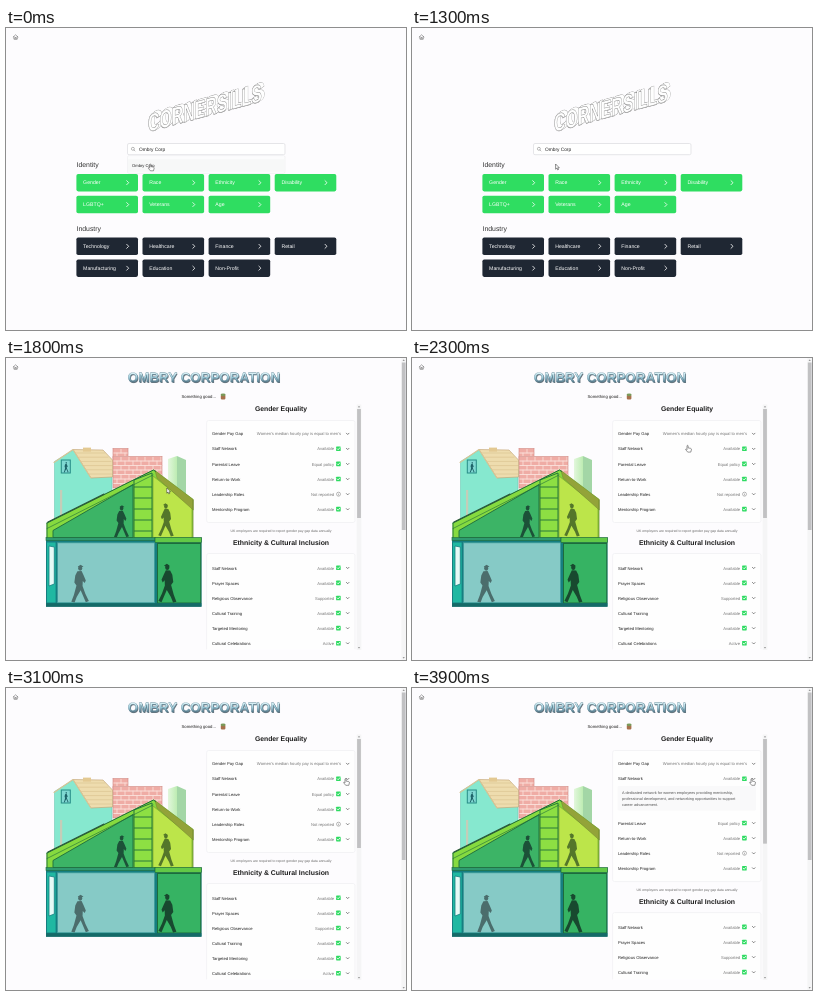
Write an HTML page that moves like this. It is 400 px wide and 302 px high and loops after 4000 ms.

```html
<!DOCTYPE html>
<html lang="en">
<head>
<meta charset="utf-8">
<title>Employer search</title>
<style>
  html, body { margin: 0; width: 100%; height: 100%; overflow: hidden; background: #fdfcfe; }
  svg { display: block; width: 100vw; height: 100vh; }
  text { font-family: "Liberation Sans", Arial, sans-serif; text-rendering: geometricPrecision; white-space: pre; }
  .bold { font-weight: 700; }
  .mid { text-anchor: middle; }
  .end { text-anchor: end; }
  .line { fill: none; stroke-linecap: round; stroke-linejoin: round; }
</style>
</head>
<body>
<svg id="stage" viewBox="0 0 400 302"></svg>
<script>
const LOOP = 4000, STEP = 100;
const COMPANY = 'Ombry Corp', COMPANY_TITLE = 'OMBRY CORPORATION', LOGOTYPE = 'CORNERSILLS';

const rect = (x, y, w, h, fill, more = '') =>
  `<rect x="${x}" y="${y}" width="${w}" height="${h}" fill="${fill}" ${more}/>`;
const label = (x, y, size, str, fill = '#222', cls = '') =>
  `<text x="${x}" y="${y}" font-size="${size}" fill="${fill}" class="${cls}">${str}</text>`;
const line = (d, stroke, width) =>
  `<path class="line" d="${d}" stroke="${stroke}" stroke-width="${width}"/>`;
const shape = (points, fill, stroke = 'none', width = 1) =>
  `<polygon points="${points}" fill="${fill}" stroke="${stroke}" stroke-width="${width}" stroke-linejoin="round"/>`;
const range = n => [...Array(n).keys()];

// ---- search page ----
function logotype() {
  const copy = (d, style) =>
    `<text class="bold" font-size="25" transform="matrix(.635 -.172 0 1 ${142 + d} ${104 - d * .8})" ${style}>${LOGOTYPE}</text>`;
  const depth = [3, 2.25, 1.5, .75, 0];
  return depth.map(d => copy(d, 'fill="#fff" stroke="#999" stroke-width=".9"')).join('')
    + depth.map(d => copy(d, 'fill="#fefefe"')).join('')
    + copy(0, 'fill="#fefefe" stroke="#888" stroke-width=".5"');
}

function buttons(names, y0, fill) {
  return names.map((name, i) => {
    const x = 70.4 + i % 4 * 66.1, y = y0 + Math.floor(i / 4) * 21.9;
    return rect(x, y, 61.6, 17.5, fill, 'rx="1.8"')
      + label(x + 6.7, y + 10.4, 5.2, name, '#fff')
      + line(`M${x + 50.3} ${y + 6.8}l2 2l-2 2`, '#fff', .8);
  }).join('');
}

const searchPage = logotype()
  + rect(121.5, 115.5, 157.5, 11.2, '#fff', 'rx="1.5" stroke="#dcdce0" stroke-width=".7"')
  + `<circle cx="126.9" cy="120.8" r="1.5" fill="none" stroke="#777" stroke-width=".5"/>`
  + line('M128 122l1 1', '#777', .5)
  + label(133, 122.8, 4.8, COMPANY)
  + label(70.5, 138.7, 6.9, 'Identity', '#333')
  + label(70.5, 202.7, 6.9, 'Industry', '#333')
  + buttons(['Gender', 'Race', 'Ethnicity', 'Disability', 'LGBTQ+', 'Veterans', 'Age'], 145.9, '#2fdd61')
  + buttons(['Technology', 'Healthcare', 'Finance', 'Retail', 'Manufacturing', 'Education', 'Non-Profit'], 209.5, '#1f2733')
  + `<g id="menu">${rect(121.5, 127.6, 157.5, 17.8, '#fcfcfd', 'rx="1.5" stroke="#ececef" stroke-width=".6"')}
     ${rect(122, 131.3, 156.5, 12.4, '#f7f8f8')}${label(126, 139.1, 4.15, COMPANY)}</g>`;

// ---- company page: house ----
const person = (x, y, k, fill, dir = 1) =>
  `<g transform="translate(${x} ${y}) scale(${k * dir} ${k})" fill="${fill}">
     <ellipse cx=".6" cy="2.7" rx="1.7" ry="2.3"/>
     <path d="M-1.5 1.6L1 -.2L3.4 1.4L0 2.6Z"/>
     <path d="M-1.8 5.4L1.8 5.2L3.4 8.6L5.4 13.2L4.4 15.4L2.8 13.6L2.6 18L5 24.6L8 30.8L5.4 31.8L1 21.6L-2.4 27.4L-4.2 32L-7 31.4L-4.8 25.6L-2.6 17.5L-4.4 15L-3.6 9Z"/>
   </g>`;

function bricks(x, y, w, rows) {
  let out = rect(x, y, w, rows * 4.5, '#efaca5');
  for (let r = 0; r < rows; r++) {
    out += line(`M${x} ${y + r * 4.5}h${w}`, '#fbe3dc', .9);
    for (let bx = x + (r % 2 ? 4 : 8); bx < x + w; bx += 8)
      out += line(`M${bx} ${y + r * 4.5}v4.5`, '#fbe3dc', .8);
  }
  return out + rect(x, y, w, rows * 4.5, 'none', 'stroke="#cf8580" stroke-width=".6"');
}

function house() {
  const dark = '#1d6b3c', teal = '#167e80', lime = '#86da3f';
  const tiles = range(6).map(i => line(`M${70 + i * 2.6} ${95 + i * 4.2}H${Math.min(106, 99 + i * 3)}`, '#d3b884', .5)).join('');
  const rungs = range(5).map(i => line(`M128.5 ${129 + i * 11}H145.5`, dark, .9)).join('');
  return shape('162,101 171,98 171,132 162,132', 'url(#fade)')
    + shape('171,98 180,102 180,138 171,132', '#a3d6a6')
    + bricks(107, 90.5, 15, 3)
    + bricks(107, 98.5, 49, 7)
    // back house
    + shape('48.5,103.5 67,92 106,112 106,140 48.5,165', '#86e8cf', '#5fc2aa', .5)
    + rect(54, 132, 2.2, 26, '#c5cdb8')
    + shape('67,91.5 97,92 106.5,102 106.5,119 85,120', '#eedcae', '#bfa071', .6) + tiles
    + rect(77, 89.6, 8, 4, '#e3c992')
    + line('M48 104.5L67 91.5L85 120', '#d8c596', 1.1)
    + rect(55.3, 102, 9, 13, '#80d9d3', 'stroke="#278d86" stroke-width="1"')
    + person(60, 104.2, .32, '#1d6268')
    // attic
    + shape('40.5,165 147.5,111.5 187,141 187,183 40.5,183', lime)
    + shape('47,179.5 47,172.5 127,126.5 127,179.5', '#3cb466', dark, .9)
    + shape('147,118 186,149 186,180 147,180', '#bce54a', '#7aa52f', .7)
    + shape('149,112.5 187.3,141.5 187.3,152 151,120', '#93a339', '#6f8a2c', .5)
    + shape('128,122 146,115 146,180 128,180', '#8ddf43', dark, .9) + rungs
    + line('M41 165L147.5 112L149.5 113.4', dark, 1)
    + line('M42 164L98 136.2', '#2c5a3a', 1.3)
    + line('M41 170.5L147 117', dark, .6)
    + line('M41 165V180', dark, .9)
    + line('M187 142V180', '#6f8a2c', .8)
    + person(115, 147.5, 1, '#1c5138')
    + person(160.5, 145.5, 1.03, '#54762a', -1)
    // ground floor
    + rect(40, 180, 155.5, 68.5, teal)
    + rect(40, 179.6, 109, 3, '#2f9a70', `stroke="${dark}" stroke-width=".6"`)
    + rect(149, 179.6, 46.5, 5, '#62c947', `stroke="${dark}" stroke-width=".7"`)
    + rect(41, 184.5, 8.6, 60, '#20b8a2')
    + shape('43,188 48.3,189 48.3,226 43,228', '#e6faf6', teal, .8)
    + rect(51.5, 184.8, 97, 60, '#86cac6', 'stroke="#3e9c9b" stroke-width=".8"')
    + rect(151.5, 185.5, 43.3, 59.5, '#36b363', `stroke="${dark}" stroke-width="1"`)
    + rect(40, 245.2, 155.5, 3.6, '#156a68')
    + person(73.5, 207, 1.17, '#4b6d6c')
    + person(162, 206, 1.2, '#18492f', -1);
}

// ---- company page: lists ----
const equality = [
  ['Gender Pay Gap', "Women's median hourly pay is equal to men's"],
  ['Staff Network', 'Available', 'yes'],
  ['Parental Leave', 'Equal policy', 'yes'],
  ['Return-to-Work', 'Available', 'yes'],
  ['Leadership Roles', 'Not reported', 'info'],
  ['Mentorship Program', 'Available', 'yes']];
const inclusion = [
  ['Staff Network', 'Available', 'yes'],
  ['Prayer Spaces', 'Available', 'yes'],
  ['Religious Observance', 'Supported', 'yes'],
  ['Cultural Training', 'Available', 'yes'],
  ['Targeted Mentoring', 'Available', 'yes'],
  ['Cultural Celebrations', 'Active', 'yes']];

const marks = {
  yes: y => rect(330.1, y - 2.4, 4.6, 4.6, '#2fdb62', 'rx=".6"') + line(`M331.2 ${y - .1}l1 1l1.6 -2`, '#fff', .8),
  info: y => `<circle cx="332.5" cy="${y}" r="2" fill="none" stroke="#777" stroke-width=".5"/>`
    + line(`M332.5 ${y - .2}v1`, '#777', .5)
};
const row = (y, [name, value, mark]) =>
  label(206, y + 1.6, 4.15, name)
  + label(mark ? 328 : 335, y + 1.6, 4.15, value, '#777', 'end')
  + (mark ? marks[mark](y) : '')
  + line(`M340.4 ${y - .6}l1.3 1.3l1.3 -1.3`, '#444', .65);
const rows = (list, y0) => list.map((r, i) => row(y0 + i * 15.08, r)).join('');
const border = 'rx="2" stroke="#f0f0f3" stroke-width=".7"';

const details = ['A dedicated network for women employees providing mentorship,',
  'professional development, and networking opportunities to support',
  'career advancement.'];

const lists = label(275, 53.3, 6.8, 'Gender Equality', '#1c1c1c', 'bold mid')
  + rect(200.6, 62.5, 148.4, 102, '#fefefe', border + ' id="card"')
  + rows(equality.slice(0, 2), 75.8)
  + `<g clip-path="url(#drawer)">${rect(205.5, 98, 138.5, 24.6, '#f9f9fa', 'rx="1"')}
     ${details.map((s, i) => label(210, 106.2 + i * 6, 3.85, s, '#555')).join('')}</g>`
  + `<g id="below">${rows(equality.slice(2), 106)}
     ${label(275, 174.4, 3.45, 'UK employers are required to report gender pay gap data annually', '#666', 'mid')}
     ${label(275, 187, 6.9, 'Ethnicity &amp; Cultural Inclusion', '#1c1c1c', 'bold mid')}
     ${rect(200.6, 195.5, 148.4, 130, '#fefefe', border)}
     ${rows(inclusion, 209.9)}</g>`;

const scrollbar = (x, y, h, thumbY, thumbH, id) =>
  rect(x, y, 4.6, h, '#f5f5f6')
  + rect(x + .4, thumbY, 3.8, thumbH, '#c1c1c3', `id="${id}"`)
  + shape(`${x + 1.2},${y + 2.8} ${x + 3.4},${y + 2.8} ${x + 2.3},${y + 1.4}`, '#777')
  + shape(`${x + 1.2},${y + h - 2.8} ${x + 3.4},${y + h - 2.8} ${x + 2.3},${y + h - 1.4}`, '#777');

const companyPage =
  label(198.7, 25.2, 13.4, COMPANY_TITLE, '#65727b', 'bold mid')
  + `<text class="bold mid" x="198" y="24.2" font-size="13.4" fill="url(#steel)" stroke="#5f8798" stroke-width=".35">${COMPANY_TITLE}</text>`
  + label(175.5, 40, 4.25, 'Something good...')
  + rect(214.8, 37, 4.6, 4.4, '#a8714c', 'rx=".8"')
  + `<ellipse cx="217.1" cy="36.8" rx="2.5" ry="1.4" fill="#7a9a5a"/>`
  + house()
  + `<g clip-path="url(#pane)">${lists}</g>`
  + scrollbar(350.7, 46.5, 245.5, 51, 109, 'thumb')
  + scrollbar(395.4, 0, 302, 4.5, 167.5, 'pageThumb');

const cursors = `<g id="cursor">
  <path id="arrow" d="M0 0V5.2L1.2 4.1L2 5.9L2.9 5.5L2.1 3.8H3.7Z" fill="#fff" stroke="#222" stroke-width=".5"/>
  <path id="hand" d="M.1 .4Q.7 -.3 1.2 .4V2.6L3.9 3.1Q4.7 3.4 4.5 4.4L3.9 6.8H.8L-1.2 4.3Q-1.3 3.4 -.4 3.7L.1 4.2Z" fill="#fff" stroke="#333" stroke-width=".5"/>
</g>`;

const defs = `<defs>
  <linearGradient id="steel" x1="0" y1="0" x2="0" y2="1">
    <stop offset=".2" stop-color="#d8f1f6"/><stop offset=".5" stop-color="#9cc9d8"/><stop offset=".82" stop-color="#4a6c7d"/>
  </linearGradient>
  <linearGradient id="fade" x1="0" y1="0" x2="1" y2="0">
    <stop offset="0" stop-color="#e2f7dc"/><stop offset="1" stop-color="#bdecb2"/>
  </linearGradient>
  <clipPath id="pane"><rect x="198" y="44" width="152" height="247.3"/></clipPath>
  <clipPath id="drawer"><rect id="drawerBox" x="200" y="97" width="150" height="0"/></clipPath>
</defs>`;

const homeIcon = line('M7.2 9L9.6 6.8L12 9M7.9 8.6V11.2H11.3V8.6M9 11V9.5H10.2V11', '#666', .55);

document.getElementById('stage').innerHTML = defs
  + rect(0, 0, 400, 302, '#fdfcfe')
  + homeIcon
  + `<g id="search">${searchPage}</g><g id="company">${companyPage}</g>` + cursors;

// ---- timing: [ms, values...] ----
const track = {
  menu: [[0, 1], [100, .5], [200, .2], [300, 0]],
  drawer: [[3200, 0], [3300, 11], [3400, 24], [3500, 27.5], [3600, 28.8], [3700, 29.1]],
  cursor: [[0, 143.6, 136], [1700, 143.6, 136], [1900, 178, 124], [2100, 250, 98], [2300, 274.9, 87.3],
    [2500, 279, 88], [2700, 315, 90], [2900, 338.9, 90.5]]
};

function sample(keys, t) {
  const i = keys.findIndex(k => k[0] > t);
  if (i === 0) return keys[0].slice(1);
  if (i < 0) return keys[keys.length - 1].slice(1);
  const [a, b] = [keys[i - 1], keys[i]], f = (t - a[0]) / (b[0] - a[0]);
  return a.slice(1).map((v, n) => v + (b[n + 1] - v) * f);
}

const el = id => document.getElementById(id);
const show = (id, on) => el(id).setAttribute('display', on ? 'inline' : 'none');

function draw() {
  const t = Math.floor(performance.now() % LOOP / STEP) * STEP;
  const [open] = sample(track.drawer, t), [x, y] = sample(track.cursor, t);
  const onCompany = t >= 1400, pointing = t < 100 || x > 200;
  show('search', !onCompany);
  show('company', onCompany);
  el('menu').setAttribute('opacity', sample(track.menu, t)[0]);
  el('drawerBox').setAttribute('height', open);
  el('card').setAttribute('height', 102 + open);
  el('below').setAttribute('transform', `translate(0 ${open})`);
  el('thumb').setAttribute('height', 109 - open * .15);
  el('cursor').setAttribute('transform', `translate(${x} ${y})`);
  show('hand', pointing);
  show('arrow', !pointing);
  requestAnimationFrame(draw);
}
draw();
</script>
</body>
</html>
```
